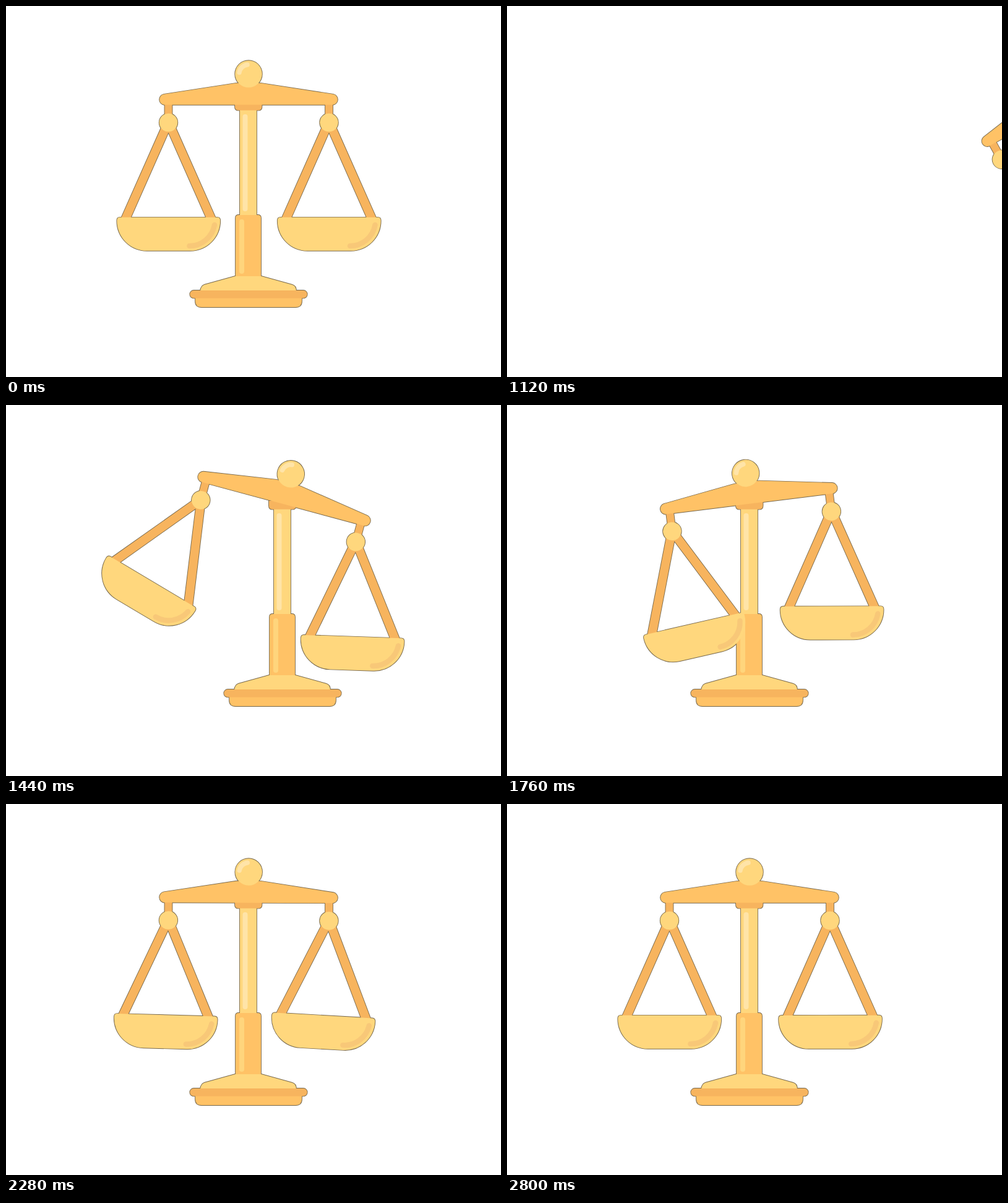
An HTML page that plays this animation: 800x600 px, repeating every 2.84 s.

```html
<!DOCTYPE html>
<html lang="en">
<head>
<meta charset="utf-8">
<title>Balance scale</title>
<style>
  html, body { margin: 0; width: 100%; height: 100%; overflow: hidden; background: #fff; }
  svg { display: block; width: 800px; height: 600px; }
  .gold { fill: #ffd77d; }
  .amber { fill: #ffc266; }
  .dark { fill: #f7b45e; }
  .shine { fill: #ffe4a8; }
</style>
</head>
<body>
<svg viewBox="0 0 800 600">
  <defs>
    <!-- origin: centre of the ring -->
    <g id="pan">
      <path class="dark" d="M0 16L-60.500 153V157H-75L-75.800 153L-8 0H8L75.800 153L75 157H60.500V153z"/>
      <path class="gold" d="M-78.500 153.300H79q4.700 0 4.700 5.500A48.500 48.500 0 0 1 35 207.300H-34.500A48.500 48.500 0 0 1-83.200 158.800q0-5.500 4.700-5.500z"/>
      <path fill="none" stroke="#f8c878" stroke-width="8.500" stroke-linecap="round" d="M74.500 165.500A41 41 0 0 1 34 199.500"/>
    </g>
    <!-- origin: column axis, top of the stage -->
    <g id="scale">
      <rect class="gold" x="-14" y="165" width="27" height="175"/>
      <rect class="shine" x="-9.500" y="175" width="8" height="157" rx="4"/>
      <path class="amber" d="M-21 437V343q0-5 5-5H15q5 0 5 5V437z"/>
      <rect x="-15" y="345" width="8" height="88" rx="4" fill="#ffd57c"/>
      <path class="amber" d="M-86 470v7q0 10 10 10H76q10 0 10-10v-7z"/>
      <path class="gold" d="M-78 461q1-8.500 7-10.300L-21.500 437H20.500L70 450.700q7 1.800 7 10.300z"/>
      <rect class="dark" x="-94.700" y="460" width="189.400" height="12.400" rx="6.200"/>
      <path class="dark" d="M-22 155V163q0 5.700 5.500 5.700H16q5.500 0 5.500-5.700V155z"/>
      <g id="beam">
        <g transform="translate(-129.500 27.500)"><use id="left" href="#pan"/></g>
        <g transform="translate(130 27.500)"><use id="right" href="#pan"/></g>
        <path class="dark" d="M-135.500-8h12V20h-12zM124-8h12V20h-12z"/>
        <circle class="gold" cx="-129.500" cy="27.500" r="14.800"/>
        <circle class="gold" cx="130" cy="27.500" r="14.800"/>
        <path class="amber" d="M-137-18.200L-20-36.200H20L137-18.200A8.600 8.600 0 0 1 136-1.200H-136A8.600 8.600 0 0 1-137-18.200z"/>
        <circle class="gold" cy="-51" r="21.800"/>
        <path fill="none" stroke="#ffe4a8" stroke-width="7.500" stroke-linecap="round" d="M-15-53.500A15 15 0 0 1-2-66"/>
      </g>
    </g>
  </defs>
  <g id="stage">
    <use href="#scale" stroke="#77684c" stroke-width="1.800"/>
    <use href="#scale"/>
  </g>
</svg>
<script>
const LOOP = 2840, STEP = 40, LEAVE = 440, ENTER = 1120, SWING = 320;
const $ = id => document.getElementById(id);

// Eases from one extreme to the next, each lasting SWING ms.
function swing(t, delay, extremes) {
  const last = extremes.length - 1;
  const k = Math.min(last, Math.max(0, (t - ENTER - delay) / SWING));
  const i = Math.min(last - 1, Math.floor(k));
  const ease = (1 - Math.cos((k - i) * Math.PI)) / 2;
  return extremes[i] + (extremes[i + 1] - extremes[i]) * ease;
}

function draw(now) {
  let t = Math.floor((now % LOOP) / STEP) * STEP;
  $('stage').style.display = t >= LEAVE && t < ENTER ? 'none' : '';
  if (t < LEAVE) t += LOOP;

  const x = 392 + swing(t, 0, [507, 55, 0]);
  const beam = swing(t, 0, [-29.2, 15.1, -7.1, 4.2, -1.6, 0]);
  const left = swing(t, 40, [-60, 34.4, -14.8, 7.2, -4, 0]);
  const right = swing(t, 120, [-35, 18.5, -8.5, 4.3, -2.6, 0]);

  $('stage').setAttribute('transform', `translate(${x} 0)`);
  $('beam').setAttribute('transform', `translate(0 161) rotate(${beam})`);
  $('left').setAttribute('transform', `rotate(${left - beam})`);
  $('right').setAttribute('transform', `rotate(${right - beam})`);
}

const start = performance.now();
function tick() {
  draw(performance.now() - start);
  requestAnimationFrame(tick);
}
tick();
</script>
</body>
</html>
```
